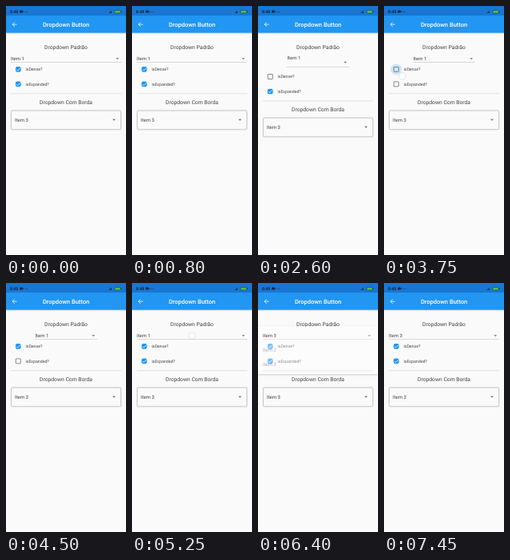
An HTML page for the animation above (8 s loop, 150 px wide and 312 px high).

```html
<!DOCTYPE html>
<html lang="pt">
<head>
<meta charset="utf-8">
<title>Dropdown Button</title>
<style>
  html, body { margin: 0; width: 100%; height: 100%; overflow: hidden; background: #fafafa; }
  svg { display: block; width: 100vw; height: 100vh; }
  text { font-family: Roboto, "Open Sans", sans-serif; fill: #000; fill-opacity: .74; text-rendering: geometricPrecision; }
  .item { font-size: 6px; }
  .label { font-size: 5.25px; }
  .head { font-size: 6.75px; text-anchor: middle; }
  .arrow { fill: #666; }
  .bar { filter: drop-shadow(0 .8px .9px rgba(0, 0, 0, .3)); }
  #menu { filter: drop-shadow(0 1.5px 1.6px rgba(0, 0, 0, .45)); }
</style>
</head>
<body>
<svg viewBox="0 0 150 312" preserveAspectRatio="none">
  <defs>
    <path id="tri" class="arrow" d="M-1.9 -.95H1.9L0 .95Z"/>
  </defs>
  <rect width="150" height="312" fill="#fafafa"/>

  <text class="head" x="75" y="53.9">Dropdown Padrão</text>
  <text class="item" id="value">Item 1</text>
  <use href="#tri" id="arrow"/>
  <rect id="line" height=".5" fill="#b4b4b4"/>

  <g id="lower">
    <g id="dense"></g>
    <g id="expanded"></g>
    <rect x="6" y="109.6" width="138" height=".6" fill="#cfcfcf"/>
    <text class="head" x="75" y="123.4">Dropdown Com Borda</text>
    <rect x="6.4" y="131" width="137.3" height="23.8" rx="1.5" fill="none" stroke="#9c9c9c" stroke-width=".6"/>
    <text class="item" x="11" y="144.7">Item 3</text>
    <use href="#tri" x="135" y="142.7"/>
  </g>

  <g id="menu">
    <rect id="sheet" width="150" rx=".75" fill="#fff"/>
    <text class="item" x="6" y="68.1">Item 1</text>
    <text class="item" x="6" y="86.1">Item 2</text>
    <text class="item" x="6" y="104.1">Item 3</text>
  </g>

  <g class="bar">
    <rect width="150" height="33.6" fill="#2196f3"/>
  </g>
  <rect width="150" height="12" fill="#1976d2"/>
  <text x="5" y="9" font-size="5.2" font-weight="500">8:48</text>
  <rect x="17.2" y="5.6" width="3.4" height="3" rx=".6" fill="#0c2440"/>
  <path d="M20.4 7.1L21.8 5.9V8.3Z" fill="#0c2440"/>
  <g fill="#0c2440" fill-opacity=".55">
    <circle cx="24" cy="7.2" r=".7"/>
    <circle cx="26.5" cy="7.2" r=".7"/>
  </g>
  <path d="M128.2 9L132 5.4V9Z" fill="#0c2440" fill-opacity=".65"/>
  <rect x="136" y="5.4" width="7.2" height="3.6" rx="1" fill="#4fc04a" stroke="#16314f" stroke-width=".5"/>
  <rect x="143.6" y="6.4" width=".8" height="1.6" fill="#16314f"/>
  <path d="M13.6 23.1H8.2M10.8 20.4L8.1 23.1L10.8 25.8" fill="none" stroke="#fff" stroke-width=".8"/>
  <text x="75" y="25.8" font-size="7.5" font-weight="500" text-anchor="middle" style="fill:#fff;fill-opacity:1">Dropdown Button</text>

  <circle id="touch" r="4.3" fill="#fff" fill-opacity=".65" stroke="#a9b0b6" stroke-opacity=".75" stroke-width=".4"/>
</svg>

<script>
const LOOP = 8000;
const $ = id => document.getElementById(id);
const set = (el, attrs) => { for (const k in attrs) el.setAttribute(k, attrs[k]); };
const ramp = (t, a, b) => Math.min(1, Math.max(0, (t - a) / (b - a)));
const ease = p => p * p * (3 - 2 * p);
const mix = (a, b, p) => a + (b - a) * p;

// [down, up, x, y]
const touches = [
  [1400, 1600, 22, 79],
  [2400, 2550, 18, 107],
  [3600, 3800, 23, 88],
  [4350, 4500, 18, 98],
  [5250, 5350, 75, 66],
  [6200, 6350, 74.5, 97.5],
  [7200, 7350, 108.5, 137.5]
];

// Each box: off / on are toggle times, lead is how long the ripple starts before them
const boxes = [
  { id: 'dense', label: 'isDense?', y: 79.4, off: 1550, on: 3750, lead: 100 },
  { id: 'expanded', label: 'isExpanded?', y: 97.9, off: 2600, on: 4550, lead: 0 }
];
const MENU = { open: 5400, close: 6350, top: 54, pad: 3, row: 18, height: 60 };

for (const b of boxes) {
  const g = $(b.id);
  g.innerHTML = `<circle cx="15.3" cy="${b.y}" fill="#2196f3"/>
    <rect rx=".5"/>
    <path d="M13 ${b.y + .1}l1.6 1.6l3.2 -3.3" fill="none" stroke="#fff" stroke-width=".8" pathLength="1" stroke-dasharray="1 2"/>
    <text class="label" x="24.4" y="${b.y + 1.9}">${b.label}</text>`;
  [b.ripple, b.rect, b.tick] = g.children;
}

const isOn = (b, t) => t < b.off || t >= b.on;

function drawBox(b, t) {
  const v = t < b.on ? 1 - ramp(t, b.off, b.off + 200) : ramp(t, b.on, b.on + 200);
  const fill = ramp(v, 0, .5), tick = ramp(v, .5, 1);
  const w = mix(.75, 3.37, fill), side = 6.75 - w;
  const c = [[97, 33], [97, 150], [97, 243]].map(([p, q]) => Math.round(mix(p, q, fill)));
  set(b.rect, {
    x: 15.3 - side / 2, y: b.y - side / 2, width: side, height: side,
    fill: fill === 1 ? '#2196f3' : 'none', stroke: `rgb(${c})`, 'stroke-width': w
  });
  set(b.tick, { 'stroke-dashoffset': 1 - tick, opacity: tick > 0 ? 1 : 0 });

  const start = (t < b.on - b.lead ? b.off : b.on) - b.lead;
  const grow = ease(ramp(t, start, start + 100));
  const fade = 1 - ramp(t, start + 120, start + 250);
  set(b.ripple, { r: 7 * grow, opacity: t > start ? .2 * fade : 0 });
}

function drawButton(t) {
  const dense = isOn(boxes[0], t), wide = isOn(boxes[1], t);
  const left = wide ? 6 : 36, right = wide ? 144 : 114;
  set($('value'), { x: left + (wide ? 0 : .4), y: dense ? 68.1 : 67.2 });
  set($('arrow'), { x: right - 4.8, y: dense ? 66.1 : 70.6 });
  set($('line'), { x: left, y: dense ? 70.2 : 76.2, width: right - left });
  set($('lower'), { transform: `translate(0 ${dense ? 0 : 9.1})` });
  $('value').textContent = t < MENU.close ? 'Item 1' : 'Item 3';
}

function drawMenu(t) {
  const p = ramp(t, MENU.open, MENU.open + 300);
  const grow = ease(ramp(p, .25, .5));
  const alpha = ramp(p, 0, .25) * (1 - ramp(t, MENU.close, MENU.close + 85));
  set($('menu'), { opacity: alpha, visibility: alpha > 0 ? 'visible' : 'hidden' });
  const top = mix(MENU.pad, 0, grow);
  const bottom = mix(MENU.pad + MENU.row, MENU.height, grow);
  set($('sheet'), { y: MENU.top + top, height: bottom - top });
  [...$('menu').querySelectorAll('text')].forEach((el, i) => {
    const from = .5 + (i + 1) / 9;
    el.setAttribute('opacity', i ? ramp(p, from, from + 1 / 6) : 1);
  });
}

function draw(t) {
  boxes.forEach(b => drawBox(b, t));
  drawButton(t);
  drawMenu(t);
  const hit = touches.find(([down, up]) => t >= down && t < up);
  set($('touch'), hit ? { cx: hit[2], cy: hit[3], visibility: 'visible' } : { visibility: 'hidden' });
}

const begin = performance.now();
function tick() {
  draw((performance.now() - begin) % LOOP);
  requestAnimationFrame(tick);
}
tick();
</script>
</body>
</html>
```
